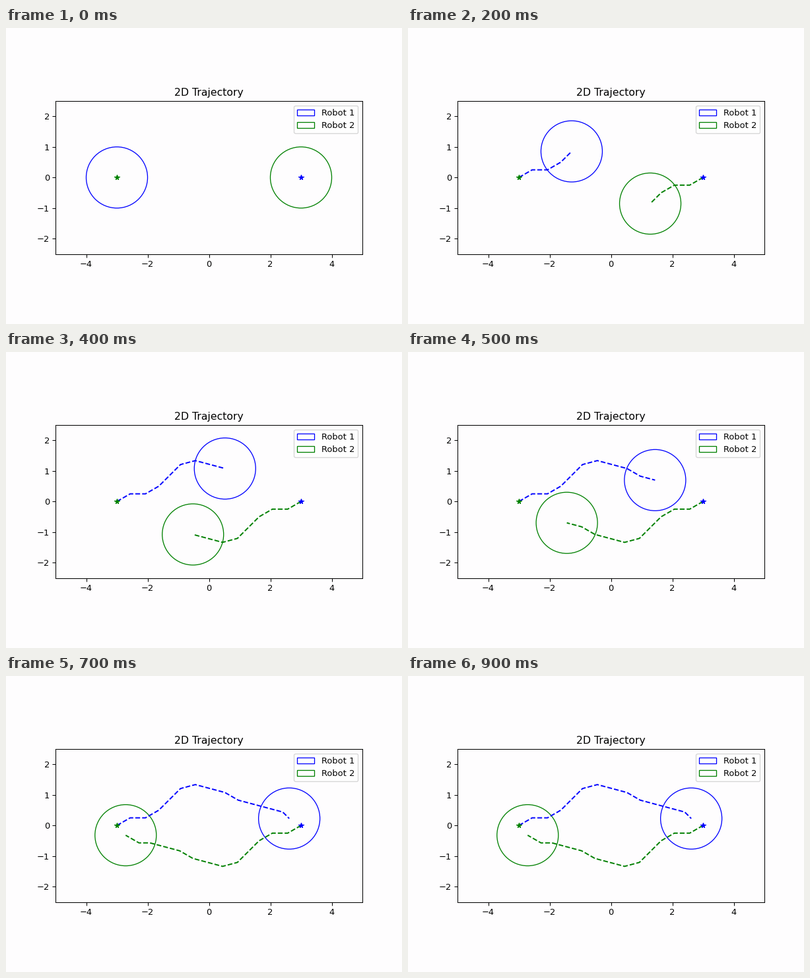
A matplotlib script for the animation above (1000 ms loop, 600 by 450 pixels).

```python
import matplotlib.pyplot as plt
import numpy as np
from matplotlib.animation import FuncAnimation

FRAMES = 10
STEP = 0.5
STEPS_PER_FRAME = 2
SHARED_TURNS = [30, 0, 30, 45, 45, 15, -15, -15, -30, -15, -15]
PAPER = "#fefdfe"


def walk(start, headings, lengths):
    """Chain straight moves, given in degrees and units, into a path."""
    angles = np.radians(headings)
    moves = np.column_stack([np.cos(angles), np.sin(angles)])
    moves *= np.asarray(lengths)[:, None]
    return np.vstack([start, start + np.cumsum(moves, axis=0)])


shared = [STEP] * len(SHARED_TURNS)
path_1 = walk(np.array([-3.0, 0.0]), SHARED_TURNS + [-15, -45], shared + [STEP, 0.3])
path_2 = walk(np.array([3.0, 0.0]),
              [180 + a for a in SHARED_TURNS] + [180, 150],
              shared + [0.36, STEP])

plt.rcParams["font.family"] = "DejaVu Sans"
fig, ax = plt.subplots(figsize=(6.4, 4.8), dpi=93.75, facecolor=PAPER)
ax.set_aspect("equal")
ax.set(xlim=(-5, 5), ylim=(-2.5, 2.5), title="2D Trajectory", facecolor=PAPER)


class Robot:
    def __init__(self, name, color, path):
        self.path = path
        self.body = ax.add_patch(
            plt.Circle(path[0], 1, fill=False, edgecolor=color, label=name))
        self.trail, = ax.plot([], [], "--", color=color)
        ax.plot(-path[0, 0], path[0, 1], "*", color=color, zorder=2.5)

    def move_to(self, step):
        step = min(step, len(self.path) - 1)
        self.body.center = self.path[step]
        self.trail.set_data(*self.path[:step + 1].T)


robots = [Robot("Robot 1", "blue", path_1), Robot("Robot 2", "green", path_2)]


def draw(frame):
    for robot in robots:
        robot.move_to(frame * STEPS_PER_FRAME)
    # The legend steps aside while the first robot passes beneath it.
    ax.legend(handles=[robot.body for robot in robots],
              loc="upper left" if frame == 6 else "upper right")
    return []


anim = FuncAnimation(fig, draw, frames=FRAMES, init_func=lambda: draw(0),
                     interval=100, repeat=True, repeat_delay=0, blit=False)
plt.show()
```
